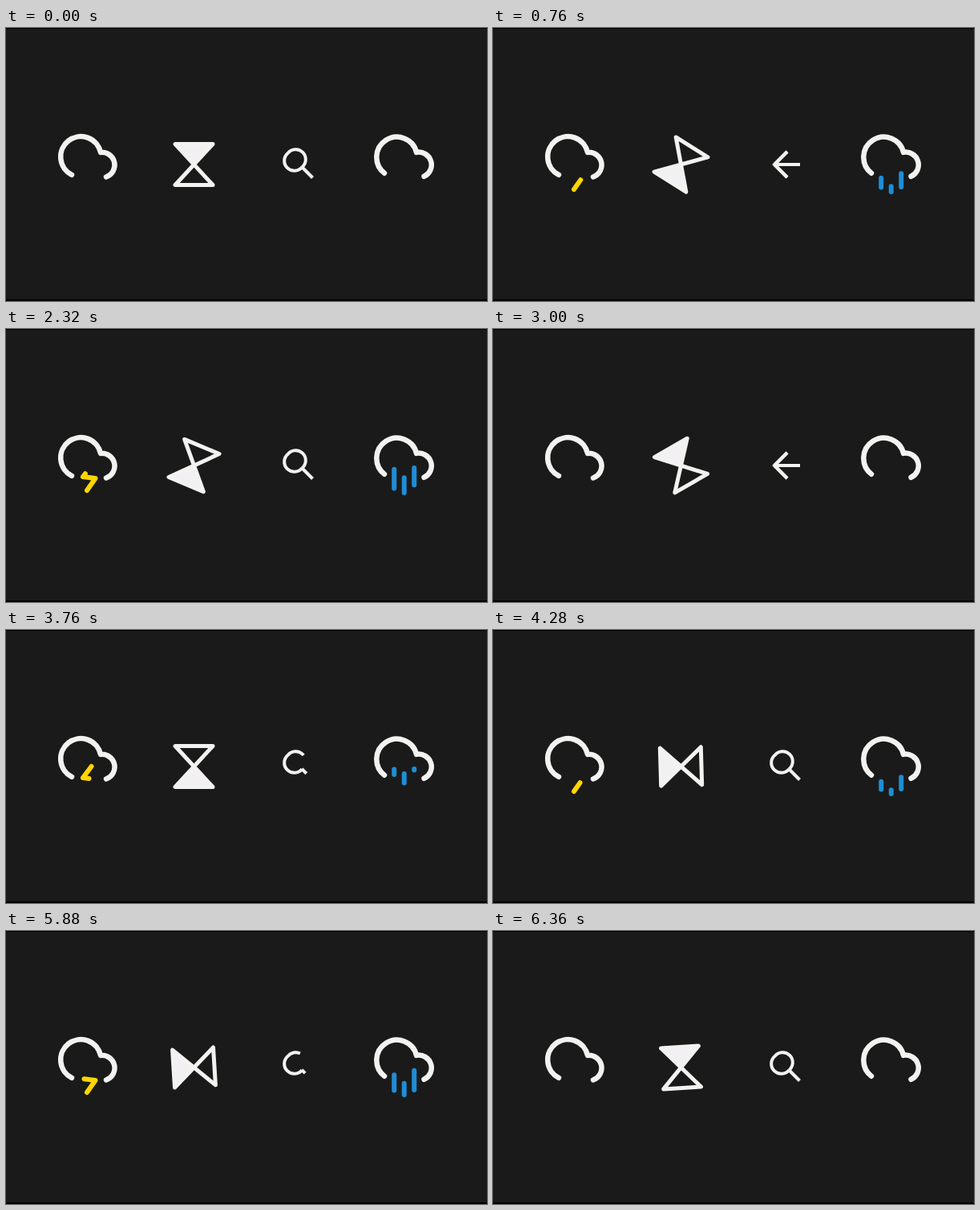
An HTML page for the animation above (6.44 s loop, 600 px wide and 340 px high).

```html
<!DOCTYPE html>
<html lang="en">
<head>
<meta charset="utf-8">
<title>Looping icons</title>
<style>
  html, body { margin: 0; width: 100%; height: 100%; overflow: hidden; background: #1a1a1a; }
  svg { display: block; width: 600px; height: 340px; }
  .line { fill: none; stroke: #f2f2f0; }
  .round { stroke-linecap: round; stroke-linejoin: round; }
  .cloud { stroke-width: 6.5; }
  .icon { stroke-width: 4; }
</style>
</head>
<body>
<svg viewBox="0 0 600 340">
  <rect width="600" height="340" fill="#1a1a1a"/>
  <rect width="600" height="1"/>
  <rect y="338" width="600" height="2"/>

  <path class="line round cloud" d="M82 182.8A25.2 25.2 0 1 1 118 154.9A15.8 15.8 0 0 1 125 185.5"/>
  <path id="bolt" class="line round" style="stroke:#ffd500" stroke-width="6" pathLength="100"
        d="M106.5 170L96 184L111.5 186L101 201"/>

  <g id="glass">
    <path id="sandTop" fill="#f2f0f2"/>
    <path id="sandBottom" fill="#f2f0f2"/>
    <path class="line round" stroke-width="5" d="M-23.5 -25.5H23.5L-23.5 25.5H23.5Z"/>
  </g>

  <path id="chevronUp" class="line icon" pathLength="100" d="M351 170L367 154"/>
  <path id="chevronDown" class="line icon" pathLength="100" d="M351 170L367 186"/>
  <path id="chevron" class="line icon" d="M367 154L351 170L367 186"/>
  <path id="shaft" class="line icon"/>
  <path id="lens" class="line icon" pathLength="100"
        d="M369.3 173.3A12.5 12.5 0 1 1 351.7 155.7A12.5 12.5 0 1 1 369.3 173.3"/>
  <path id="handle" class="line icon" pathLength="100" d="M369 173L382.5 186.5"/>

  <path class="line round cloud" d="M472 180.7A25.2 25.2 0 1 1 512 154.9A15.8 15.8 0 0 1 521.5 184.8"/>
  <g class="line round" style="stroke:#1f8dd6" stroke-width="6">
    <path id="dropLeft"/>
    <path id="dropMiddle"/>
    <path id="dropRight"/>
  </g>
</svg>
<script>
const LOOP = 6440;
const $ = id => document.getElementById(id);
const clamp = x => Math.min(1, Math.max(0, x));
const progress = (t, from, to) => clamp((t - from) / (to - from));
const mod = (x, n) => ((x % n) + n) % n;
const show = (el, on) => el.setAttribute("visibility", on ? "visible" : "hidden");

// Shows the part of a path between two fractions of its length.
function trim(id, from, to) {
  const el = $(id);
  show(el, to > from);
  el.setAttribute("stroke-dasharray", to - from >= 1 ? "none" : `${(to - from) * 100} 300`);
  el.setAttribute("stroke-dashoffset", -from * 100);
}

function drawBolt(t) {
  const u = t < 48 ? -1 : mod(t - 48, 1755);
  trim("bolt", progress(u, 415, 830), progress(u, 0, 415));
}

function drawDrop(id, x, top, travelled, length = 25) {
  const tail = clamp(travelled / length - 1) * length;
  const front = clamp(travelled / length) * length;
  show($(id), front > tail);
  $(id).setAttribute("d", `M${x} ${top + tail}V${top + front}`);
}

function drawRain(t) {
  const travelled = t < 96 ? -1 : mod(t - 96, 1745) * 0.065;
  drawDrop("dropMiddle", 496.7, 179, travelled);
  drawDrop("dropLeft", 484.2, 173.5, travelled - 5);
  drawDrop("dropRight", 509.2, 173, travelled - 10);
}

function drawGlass(t) {
  const u = mod(t, LOOP / 4);
  const angle = 180 * progress(u, 590, 1550);
  const drained = progress(u, 40, 580);
  const slope = 23.5 / 25.5;
  const level = 25.5 * (1 - drained);
  $("glass").setAttribute("transform", `translate(234.5 170) rotate(${angle})`);
  $("sandTop").setAttribute("d", `M0 0L${-level * slope} ${-level}H${level * slope}Z`);
  $("sandBottom").setAttribute("d",
    `M${-level * slope} ${level}H${level * slope}L23.5 25.5H-23.5Z`);
}

// The magnifier (1) turns into a back arrow (0) and back again.
function drawSearch(t) {
  const u = mod(t, LOOP / 3);
  const p = u < 1000 ? 1 - progress(u, 210, 600) : progress(u, 1300, 1740);
  const retract = progress(p, 0.15, 0.6);
  trim("chevronUp", 0, 1 - retract);
  trim("chevronDown", 0, 1 - retract);
  show($("chevron"), retract === 0);

  const left = 350 + 41 * progress(p, 0.18, 0.65);
  const right = 383 + 8 * progress(p, 0, 0.13);
  show($("shaft"), left < right);
  $("shaft").setAttribute("d", `M${left} 170H${right}`);

  trim("lens", 0, progress(p, 0.03, 0.92));
  trim("handle", 0, progress(p, 0.5, 1));
}

function render(t) {
  drawBolt(t);
  drawGlass(t);
  drawSearch(t);
  drawRain(t);
}

const start = performance.now();
function tick() {
  render((performance.now() - start) % LOOP);
  requestAnimationFrame(tick);
}
tick();
</script>
</body>
</html>
```
